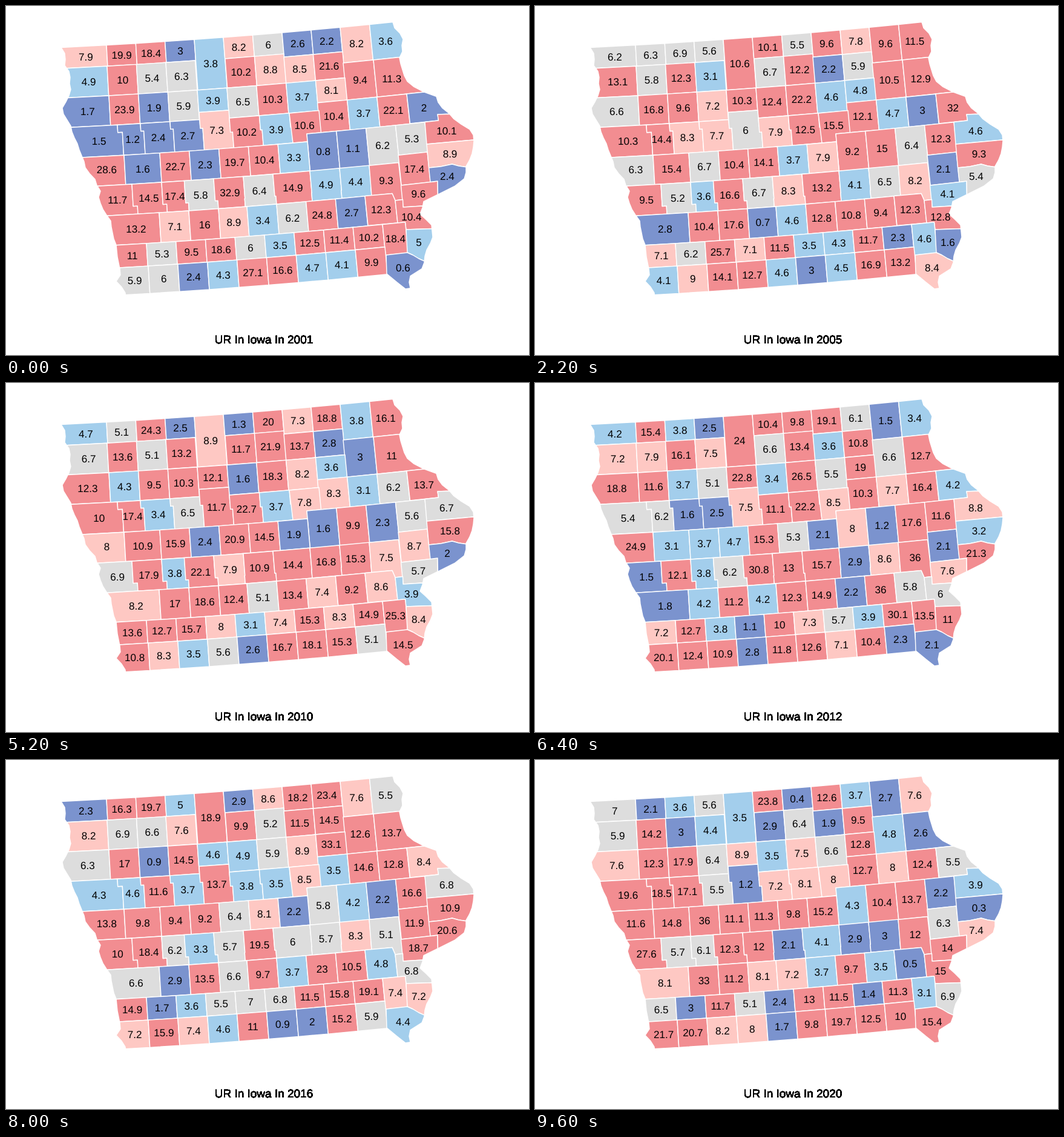
An HTML page that plays this animation: 864 by 576 pixels, repeating every 10000 ms.

```html
<!DOCTYPE html>
<html lang="en">
<head>
<meta charset="utf-8">
<title>Yearly rate map</title>
<style>
  html, body { margin: 0; width: 100%; height: 100%; overflow: hidden; background: #fff; }
  svg { display: block; width: 864px; height: 576px; }
  polygon { stroke: #fff; stroke-width: 1.42; stroke-linejoin: round; }
  text { font-family: "Liberation Sans", Arial, sans-serif; text-anchor: middle; text-rendering: geometricPrecision; }
  .label { font-size: 17.07px; }
  .title { font-size: 19px; }
</style>
</head>
<body>
<svg viewBox="0 0 864 576"><g id="areas"></g><g id="labels"></g><g id="titles"></g></svg>
<script>
const LOOP = 10000, FIRST_YEAR = 2001;
// Conic projection: parallels are circles around a far pole, depth 0 is the northern border.
const POLE_X = -384, POLE_Y = -9720, RADIUS = 9800;
// River banks: x at every 10 px of depth.
const STEP = 10;
const west = [91, 97, 98, 97, 104, 106, 105, 107, 104, 99, 93, 95, 101, 107, 109, 113, 118, 121, 125, 129, 131,
  138, 147, 150, 156, 153, 156, 160, 166, 173, 174, 176, 178, 182, 183, 184, 186, 188, 189, 182, 191, 197, 198];
const east = [639, 642, 651, 656, 654, 655, 650, 652, 655, 658, 663, 674, 690, 711, 714, 721, 732, 740, 752, 766, 772,
  773, 772, 770, 766, 760, 760, 757, 742, 716, 690, 688, 684, 694, 703, 704, 705, 701, 695, 692, 691, 687, 668, 666, 668];
const cells = [], titles = [];

function add(parent, tag, attrs) {
  const el = document.createElementNS('http://www.w3.org/2000/svg', tag);
  for (const key in attrs) el.setAttribute(key, attrs[key]);
  return document.getElementById(parent).appendChild(el);
}

function centroid(pts) {
  let area = 0, x = 0, y = 0;
  pts.forEach(([ax, ay], i) => {
    const [bx, by] = pts[(i + 1) % pts.length];
    const cross = ax * by - bx * ay;
    area += cross;
    x += (ax + bx) * cross;
    y += (ay + by) * cross;
  });
  return [x / area / 3, y / area / 3];
}

function cell(...parts) {
  const pts = parts.flat();
  const [x, y] = centroid(pts);
  cells.push({
    shape: add('areas', 'polygon', { points: pts.map(p => p.map(v => v.toFixed(2))).join(' ') }),
    label: add('labels', 'text', { class: 'label', x: x.toFixed(2), y: (y + 6.1).toFixed(2) })
  });
}

// The point with this x on the parallel at a depth.
const place = (x, depth) => [x, POLE_Y + Math.sqrt((RADIUS + depth) ** 2 - (x - POLE_X) ** 2)];

// The same meridian, followed from one depth to another.
const follow = (x, from, to) => place(POLE_X + (x - POLE_X) * (RADIUS + to) / (RADIUS + from), to);

function along(bank, from, to) {
  const depths = [from];
  for (let d = (Math.floor(from / STEP) + 1) * STEP; d < to; d += STEP) depths.push(d);
  depths.push(to);
  return depths.map(d => {
    const i = Math.floor(d / STEP), next = bank[i + 1] ?? bank[i];
    return place(bank[i] + (next - bank[i]) * (d / STEP - i), d);
  });
}

// n + 1 evenly spaced values.
const span = (a, b, n) => Array.from({ length: n + 1 }, (_, i) => a + (b - a) * i / n);

// A north-south border: a bank, a meridian, or two meridians with a jog between.
function border(top, bottom, d0, d1, jog) {
  if (Array.isArray(top)) return along(top, d0, d1);
  if (!jog) return [place(top, d0), follow(top, d0, d1)];
  return [place(top, d0), follow(top, d0, jog), follow(bottom, d1, jog), place(bottom, d1)];
}

// Neighbouring areas between two depths, west to east.
function row(d0, d1, tops, jog, bottoms = tops) {
  const borders = tops.map((top, i) => border(top, bottoms[i], d0, d1, jog));
  for (let i = 1; i < borders.length; i++) cell(borders[i - 1], [...borders[i]].reverse());
}

row(0, 34.7, [west, ...span(166, 311, 3)]);
row(0, 83.7, [311, 359]);
row(0, 35.3, span(359, 456, 2));
row(0, 40.5, span(456, 552, 2));
row(0, 59, [552, 600.5, east]);

row(34.7, 83.5, [west, ...span(167, 312.5, 3)]);
row(35.3, 83.7, span(362, 459, 2));
row(40.5, 83.7, span(459, 556, 2));
row(59, 120.5, [557, 607, east]);

row(83.5, 132.5, [west, ...span(170, 316, 3)]);
row(83.7, 120.5, [316, 365]);
row(83.7, 133.5, span(365, 511.5, 3));
row(83.7, 120.5, [511.5, 560]);
row(120.5, 170, span(514.5, 662, 3));
cell([[662, 145]], along(east, 120.5, 161), [[713, 179], [714.5, 189], [667.5, 194]]);

row(132.5, 183, [west, 184, ...span(222, 320, 2)], 145, [west, 194.5, ...span(230, 327.6, 2)]);
row(120.5, 183, [319, 368], 147, [327.6, 376.4]);
row(133.5, 183, span(369, 468, 2), 157, span(376.4, 474, 2));
cell([[468, 177], [517, 172.5], [520.5, 209], [497, 211], [498, 224], [474, 226]]);
row(170, 232, span(497, 643.5, 3));
row(170, 219.5, [643.5, 692]);
cell([[692, 191.5], [714.5, 189], [713, 179]], along(east, 161, 208), [[695, 228]]);

row(183, 231.5, [west, 195, ...span(254, 498, 5)]);
row(219.5, 269.5, [648, 696]);
cell([[695, 228]], along(east, 208, 251), [[748, 264], [737, 261], [718, 265], [698.5, 267]]);

row(231.5, 281.3, [west, 208, 257, 294.5, ...span(343, 441, 2), ...span(502, 600, 2)], 268,
  [west, 218, 266.5, 302.5, 351, 395.3, 447, ...span(506, 604, 2)]);
cell([[600, 263.3], [648.5, 258.5], [655.5, 319.5], [643, 321], [638, 309.5], [604, 313]]);
cell([[652.5, 296], [701, 290.5], [713, 289]], along(east, 291, 307), [[656, 332]]);
cell([[698.5, 267], [718, 265], [737, 261], [748, 264]], along(east, 251, 291), [[713, 289], [701, 290.5]]);

row(281.3, 330.6, [west, ...span(253, 351, 2), 398, ...span(447, 593, 3)]);
cell([[593, 313.5], [638, 309.5], [643, 321], [647, 358], [598, 362.5]]);
cell([[643, 321], [655.5, 319.5], [656, 332]], along(east, 307, 346), [[661, 369], [659.5, 357], [647, 358]]);

row(330.6, 368, [west, ...span(232, 622, 8)]);
row(330.6, 381.5, [622, 659.5]);
cell([[661, 369]], along(east, 346, 398), [[682, 417], [672, 411], [663, 407]]);

row(368, 413.3, [west, ...span(235, 626, 8)]);
cell([[628, 411], [663, 407], [672, 411], [682, 417]], along(east, 398, 440),
  [[660, 467], [646, 456], [629, 442]]);

// The caption is stacked, which gives it its heavy edges.
for (let i = 0; i < 16; i++) titles.push(add('titles', 'text', { class: 'title', x: 426, y: 557 }));

function seeded(seed) {
  return () => {
    seed = (seed + 0x6D2B79F5) | 0;
    let t = Math.imul(seed ^ (seed >>> 15), 1 | seed);
    t = (t + Math.imul(t ^ (t >>> 7), 61 | t)) ^ t;
    return ((t ^ (t >>> 14)) >>> 0) / 4294967296;
  };
}

// Every year draws its own rates: the sum of two exponential values, to one decimal.
function ratesOf(year) {
  const rand = seeded(year * 7919);
  const draw = () => -4.7 * Math.log(1 - rand());
  return cells.map(() => Math.round(10 * Math.min(36, Math.max(0.2, draw() + draw()))) / 10);
}

function colorOf(rate) {
  if (rate <= 3) return '#7b93ce';
  if (rate <= 5) return '#a3ceec';
  if (rate <= 7) return '#dddddd';
  if (rate <= 9) return '#fec8c3';
  return '#f28d91';
}

function yearAt(t) {
  if (t < 400) return FIRST_YEAR;
  if (t < 6400) return FIRST_YEAR + 1 + Math.floor((t - 400) / 600);
  return FIRST_YEAR + 11 + Math.floor((t - 6400) / 400);
}

let shown = 0;
function draw(t) {
  const year = yearAt(t);
  if (year === shown) return;
  shown = year;
  ratesOf(year).forEach((rate, i) => {
    cells[i].shape.setAttribute('fill', colorOf(rate));
    cells[i].label.textContent = rate;
  });
  for (const title of titles) title.textContent = 'UR In Iowa In ' + year;
}

function tick() {
  draw(performance.now() % LOOP);
  requestAnimationFrame(tick);
}
tick();
</script>
</body>
</html>
```
